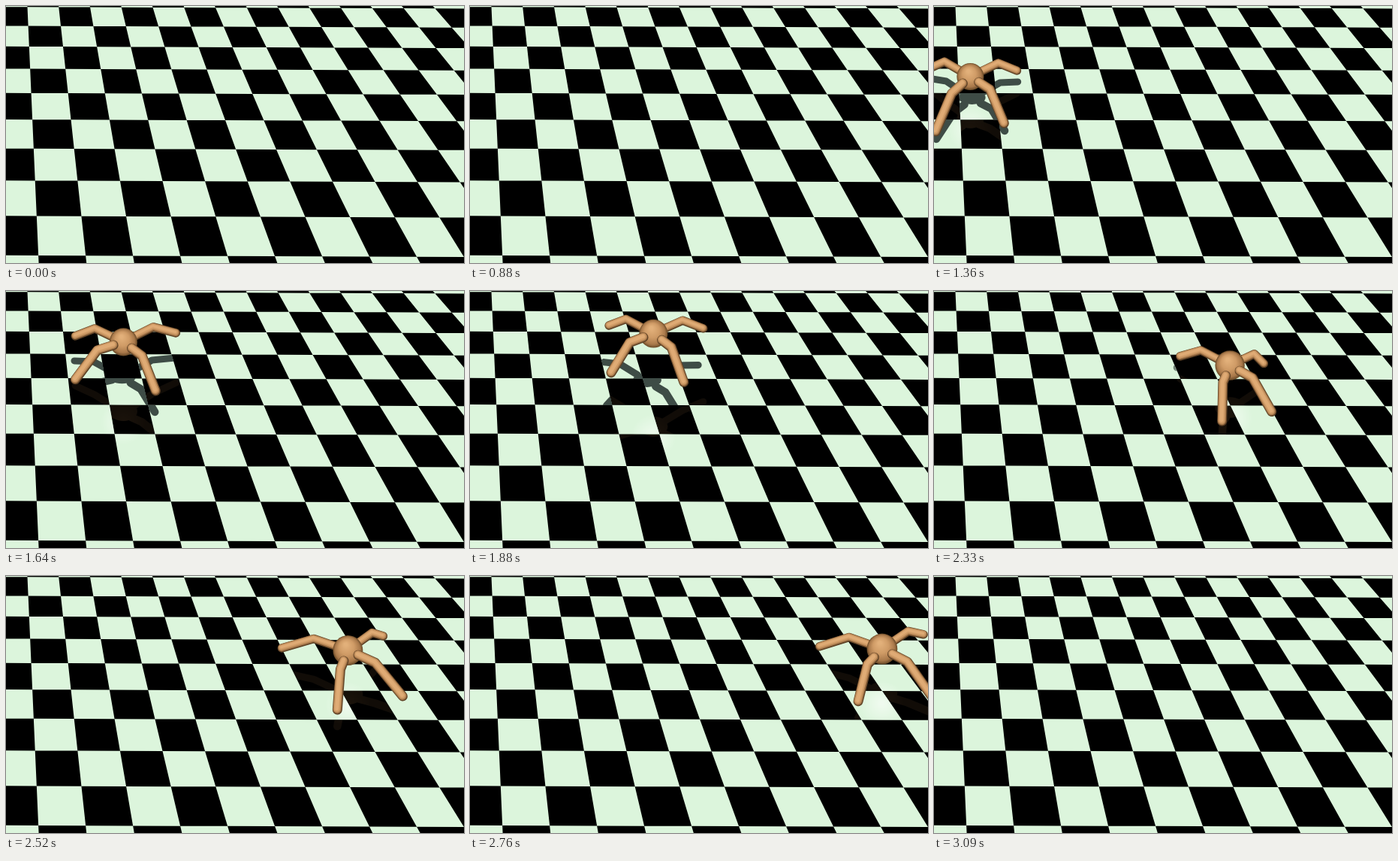
Write an HTML page with a canvas that moves like this. It is 610 px wide and 342 px high and loops after 3.12 s.

```html
<!DOCTYPE html>
<html lang="en">
<head>
<meta charset="utf-8">
<title>Walker on a checkered floor</title>
<style>
html, body { margin: 0; width: 100%; height: 100%; overflow: hidden; background: #000; }
canvas { display: block; }
</style>
</head>
<body>
<canvas id="stage" width="610" height="342"></canvas>
<script>
const ctx = document.getElementById('stage').getContext('2d');
const W = 610, H = 342, LOOP = 3120;
const ENTER = 1030, LEAVE = 3090;
const LIGHT = '#dcf5dc', SHADE = '#3e4c46';

// Foot offsets from the torso: back left, back right, front left, front right
const CROUCH = [-52, -12, 62, -8, -46, 73, 45, 62];
const SPREAD = [-64, -8, 70, -12, -64, 50, 43, 65];
const TUCK = [-40, -22, 49, 15, -19, 63, 32, 63];
const REACH = [-88, -3, 47, -19, -14, 79, 73, 61];

// time, torso x, torso y, height above the floor, feet
const KEYS = [
  [1000, -90, 84, 12, REACH],
  [1360, 48, 94, 4, CROUCH],
  [1640, 156, 68, 22, SPREAD],
  [1820, 222, 51, 42, SPREAD],
  [2120, 330, 92, 8, TUCK],
  [2520, 455, 99, 5, REACH],
  [3090, 684, 92, 6, SPREAD]
].map(([t, x, y, lift, feet]) => ({ t, v: [x, y, lift, ...feet] }));

function slope(i, n) {
  const a = KEYS[Math.max(0, i - 1)], b = KEYS[Math.min(KEYS.length - 1, i + 1)];
  return (b.v[n] - a.v[n]) / (b.t - a.t);
}

// Cubic Hermite through the keys
function stateAt(t) {
  let i = 0;
  while (i < KEYS.length - 2 && KEYS[i + 1].t <= t) i++;
  const a = KEYS[i], b = KEYS[i + 1], d = b.t - a.t;
  const s = (t - a.t) / d, s2 = s * s, s3 = s2 * s;
  return a.v.map((p, n) =>
    (2 * s3 - 3 * s2 + 1) * p + (s3 - 2 * s2 + s) * d * slope(i, n) +
    (3 * s2 - 2 * s3) * b.v[n] + (s3 - s2) * d * slope(i + 1, n));
}

// Floor grid to screen
function floorPoint(u, v) {
  const w = 1 - 0.03745 * v;
  return [(41.76 * u + 0.03 * v + 28) / w + 0.5, (0.15 * u + 24.32 * v + 1) / w + 0.3];
}

function drawFloor() {
  ctx.fillStyle = '#000';
  ctx.fillRect(0, 0, W, H);
  ctx.fillStyle = LIGHT;
  ctx.beginPath();
  for (let v = -1; v < 10; v++) {
    for (let u = -2; u < 16; u++) {
      if ((u + v) & 1) continue;
      ctx.moveTo(...floorPoint(u, v));
      ctx.lineTo(...floorPoint(u + 1, v));
      ctx.lineTo(...floorPoint(u + 1, v + 1));
      ctx.lineTo(...floorPoint(u, v + 1));
      ctx.closePath();
    }
  }
  ctx.fill();
}

// The less a leg is stretched, the further its knee bends outward
function buildBody([x, y, lift, ...feet]) {
  const r = 17.8 + x / 210;
  const legs = [0, 1, 2, 3].map(i => {
    const fx = feet[i * 2], fy = feet[i * 2 + 1], back = i < 2;
    const slack = Math.max(0, 95 - Math.hypot(fx, fy));
    const kx = fx * 0.5 + Math.sign(fx) * slack * 0.2, ky = fy * 0.5 - 14;
    const k = r * 0.75 / Math.hypot(kx, ky);
    return {
      width: back ? 11.5 : 13,
      points: [
        { x: x + kx * k, y: y + ky * k, h: 24 + lift },
        { x: x + kx, y: y + ky, h: 22 + lift },
        { x: x + fx, y: y + fy, h: (back ? 11 : 6) + lift }
      ]
    };
  });
  return { x, y, r, h: 24 + lift, legs };
}

function limb(points, width, color, dx = 0, dy = 0) {
  ctx.lineCap = ctx.lineJoin = 'round';
  ctx.lineWidth = width;
  ctx.strokeStyle = color;
  ctx.beginPath();
  points.forEach(p => ctx.lineTo(p.x + dx, p.y + dy));
  ctx.stroke();
}

// Flat copy of the body, each point moved according to its height
function silhouette(body, move, color, flat) {
  for (const leg of body.legs) limb(leg.points.map(move), leg.width * 0.8, color);
  const c = move(body);
  ctx.fillStyle = color;
  ctx.beginPath();
  ctx.ellipse(c.x, c.y, body.r, body.r * flat, 0, 0, 7);
  ctx.fill();
}

// Shadows end where the lamp's cone ends
function drawShadow(body) {
  const tone = ctx.createLinearGradient(312, 0, 338, 0);
  tone.addColorStop(0, SHADE);
  tone.addColorStop(1, LIGHT);
  const lean = 0.08 - Math.max(0, body.x - 48) * 0.0011;
  ctx.globalCompositeOperation = 'darken';
  silhouette(body, p => ({ x: p.x + p.h * lean, y: p.y + p.h }), tone, 0.5);
}

function drawReflection(body) {
  ctx.globalCompositeOperation = 'lighten';
  silhouette(body, p => ({ x: p.x, y: p.y + p.h * 2 }), 'rgb(17,12,7)', 0.7);
  const cy = body.y + body.h * 2 + 14;
  const glow = ctx.createRadialGradient(body.x, cy, 2, body.x, cy, 30);
  glow.addColorStop(0, 'rgba(255,255,250,.55)');
  glow.addColorStop(1, 'rgba(255,255,250,0)');
  ctx.globalCompositeOperation = 'overlay';
  ctx.fillStyle = glow;
  ctx.fillRect(body.x - 30, cy - 30, 60, 60);
}

function drawLeg({ points, width }) {
  limb(points, width, '#5f4226');
  limb(points, width - 2, '#a97a4c', -0.3, -0.6);
  limb(points, width - 4.5, '#cf9b66', -0.5, -1);
  limb(points, width - 8, '#dfab75', -0.7, -1.4);
}

function drawTorso({ x, y, r }) {
  const g = ctx.createRadialGradient(x - r * 0.15, y - r * 0.4, r * 0.1, x, y, r);
  g.addColorStop(0, '#e2b07a');
  g.addColorStop(0.45, '#cf9b66');
  g.addColorStop(0.82, '#a8784a');
  g.addColorStop(1, '#674826');
  ctx.fillStyle = g;
  ctx.beginPath();
  ctx.arc(x, y, r, 0, 7);
  ctx.fill();
}

function draw(t) {
  ctx.globalCompositeOperation = 'source-over';
  drawFloor();
  if (t < ENTER || t >= LEAVE) return;
  const body = buildBody(stateAt(t));
  drawReflection(body);
  drawShadow(body);
  ctx.globalCompositeOperation = 'source-over';
  body.legs.slice(0, 2).forEach(drawLeg);
  drawTorso(body);
  body.legs.slice(2).forEach(drawLeg);
}

const start = performance.now();
function tick() {
  draw((performance.now() - start) % LOOP);
  requestAnimationFrame(tick);
}
tick();
</script>
</body>
</html>
```
